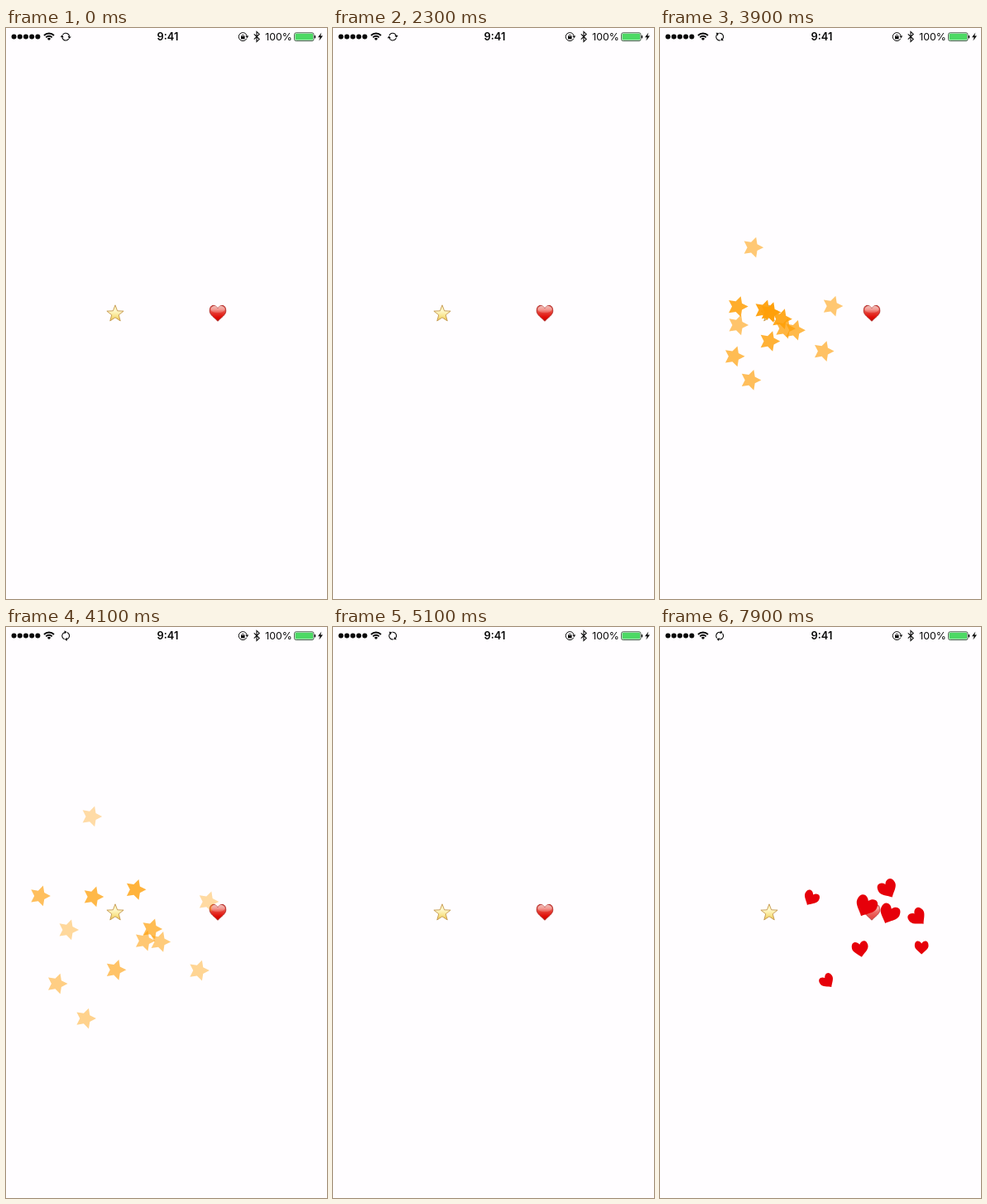
Recreate the animation shown at these times as an HTML page with a canvas. Size 388x690 px, loop 8 s.

```html
<!DOCTYPE html>
<html lang="en">
<head>
<meta charset="utf-8">
<title>Emitter buttons</title>
<style>
html, body { margin: 0; width: 100%; height: 100%; overflow: hidden; background: #fffdff; }
canvas { display: block; width: 388px; height: 690px; }
</style>
</head>
<body>
<canvas id="stage"></canvas>
<script>
const W = 388, H = 690, LOOP = 8000, TAU = Math.PI * 2;
const canvas = document.getElementById('stage');
const ratio = window.devicePixelRatio || 1;
canvas.width = W * ratio;
canvas.height = H * ratio;
const ctx = canvas.getContext('2d');
const INK = '#080808', FONT = 'Inter, "Liberation Sans", sans-serif';

// Each button switches off, then on again with a burst.
// Shots are velocities in px/s, with an optional tilt in degrees.
const starBtn = {
  x: 132, y: 345, off: 2850, on: 3460, span: 430,
  shots: [
    [-45, -181], [180, -21], [-95, 35], [177, 123], [-67, 238], [-140, 171], [116, 76],
    [83, 80], [1, 179], [-264, -58], [146, 66], [-104, -74], [116, -131]
  ]
};
const heartBtn = {
  x: 256, y: 344.5, off: 6550, on: 7520, span: 340,
  shots: [
    [158, 111, 0], [-153, 235, -36], [-233, -54, 30], [-52, 165, -10],
    [255, 28, -42], [119, -175, -28], [206, 20, 24], [-175, -175, 26]
  ]
};

const rad = deg => deg * Math.PI / 180;
const isOn = (btn, t) => t < btn.off || t >= btn.on;

function at(x, y, angle, draw) {
  ctx.save();
  ctx.translate(x, y);
  ctx.rotate(angle);
  draw();
  ctx.restore();
}

function starPath(r, inner) {
  ctx.beginPath();
  for (let i = 0; i < 10; i++) {
    const a = -Math.PI / 2 + i * Math.PI / 5;
    const d = i % 2 ? r * inner : r;
    ctx.lineTo(Math.cos(a) * d, Math.sin(a) * d);
  }
  ctx.closePath();
}

function heartPath(w, h) {
  const x = w / 2, y = h / 2;
  ctx.beginPath();
  ctx.moveTo(0, -y * 0.62);
  for (const side of [1, -1]) {
    const p = side * x;
    if (side > 0) {
      ctx.bezierCurveTo(p * 0.28, -y * 1.14, p, -y * 1.2, p, -y * 0.3);
      ctx.bezierCurveTo(p, y * 0.22, p * 0.32, y * 0.6, 0, y);
    } else {
      ctx.bezierCurveTo(p * 0.32, y * 0.6, p, y * 0.22, p, -y * 0.3);
      ctx.bezierCurveTo(p, -y * 1.2, p * 0.28, -y * 1.14, 0, -y * 0.62);
    }
  }
  ctx.closePath();
}

function gradient(top, bottom, stops) {
  const g = ctx.createLinearGradient(0, top, 0, bottom);
  stops.forEach((c, i) => g.addColorStop(i / (stops.length - 1), c));
  return g;
}

function paint(fill, stroke, width) {
  if (fill) { ctx.fillStyle = fill; ctx.fill(); }
  if (stroke) { ctx.strokeStyle = stroke; ctx.lineWidth = width; ctx.stroke(); }
}

function starButton(filled) {
  at(starBtn.x, starBtn.y + 0.4, 0, () => {
    starPath(10.6, 0.42);
    ctx.lineJoin = 'round';
    if (!filled) return paint(null, '#e8a94a', 1);
    paint(gradient(-10, 9, ['#fff4b0', '#fff8cc', '#f9e58e', '#e8bd4a']), '#c4974f', 0.9);
  });
}

function heartButton(filled, alpha) {
  at(heartBtn.x, heartBtn.y + 0.3, 0, () => {
    ctx.globalAlpha = alpha;
    if (!filled) {
      heartPath(16, 17);
      return paint(null, '#d4424e', 1.2);
    }
    heartPath(19.6, 19);
    paint(gradient(-10, 10, ['#c9504c', '#ea6a61', '#e5342b', '#e00b05', '#b80d08']), '#ae2522', 0.9);
    ctx.clip();
    ctx.beginPath();
    ctx.ellipse(0, -5, 8.6, 4.5, 0, 0, TAU);
    paint(gradient(-9, 0, ['rgba(255,235,230,.72)', 'rgba(255,205,200,.12)']));
  });
}

// Particles leave one after another, fly straight and live for one second.
function burst(btn, t, draw) {
  btn.shots.forEach(([vx, vy, tilt = 18], i, all) => {
    const birth = btn.on + btn.span * (i / (all.length - 1)) ** 1.3;
    const age = (t - birth) / 1000;
    if (age < 0 || age >= 1) return;
    at(btn.x + vx * age, btn.y + vy * age, rad(tilt), () => draw(age));
  });
}

function starParticle(age) {
  ctx.globalAlpha = 1 - age;
  starPath(13, 0.51);
  paint('#ff9f08');
}

function heartParticle(age) {
  const w = 27 * (1 - age);
  ctx.translate(0, 0.8);
  heartPath(w, w * 0.96);
  paint('#e6000a');
}

function poly(points, fill) {
  ctx.beginPath();
  points.forEach(([x, y]) => ctx.lineTo(x, y));
  if (fill) { ctx.closePath(); paint(INK); }
  else paint(null, INK, 1.1);
}

function arc(x, y, r, from, to, width) {
  ctx.beginPath();
  ctx.arc(x, y, r, rad(from), rad(to));
  paint(null, INK, width);
}

function pill(x, y, w, h, r, fill, stroke) {
  ctx.beginPath();
  ctx.roundRect(x, y, w, h, r);
  paint(fill, stroke, 0.9);
}

function label(text, x, font, align) {
  ctx.font = font + ' ' + FONT;
  ctx.textAlign = align;
  ctx.fillStyle = INK;
  ctx.fillText(text, x, 15.2);
}

function syncIcon(t) {
  at(72.2, 10.6, Math.PI * (t - 2300) / 1200, () => {
    for (let i = 0; i < 2; i++) {
      arc(0, 0, 4.4, 200, 340, 1.1);
      poly([[2.2, -1.6], [6.4, -1.6], [4.5, 1.2]], true);
      ctx.rotate(Math.PI);
    }
  });
}

function statusBar(t) {
  for (let i = 0; i < 5; i++) {
    ctx.beginPath();
    ctx.arc(9.6 + i * 7.2, 10.6, 3, 0, TAU);
    paint(INK);
  }
  // wifi
  for (const r of [1.5, 5.2, 8.5]) arc(52, 15, r, 225, 315, r < 2 ? 3 : 1.9);

  syncIcon(t);
  label('9:41', 195.4, '600 12.8px', 'center');

  // rotation lock
  arc(286.3, 10.6, 5, 25, 345, 1);
  poly([[289.3, 9.6], [293.3, 9.6], [291.4, 12.2]], true);
  ctx.fillStyle = INK;
  ctx.fillRect(284, 10, 4.6, 3.4);
  arc(286.3, 9.9, 1.5, 180, 360, 0.9);

  // bluetooth
  poly([[299.8, 7.4], [306.2, 13.6], [303, 16.6], [303, 4.4], [306.2, 7.4], [299.8, 13.6]]);

  label('100%', 345.8, '400 12.3px', 'right');

  // battery and charging bolt
  pill(348.6, 5.8, 23.4, 9.8, 2, null, '#2c4a31');
  pill(349.6, 6.8, 21.4, 7.8, 1, '#4cd964');
  pill(372.7, 9, 1.5, 3.4, 0.7, INK);
  poly([[381.4, 5.6], [377, 11.3], [379.6, 11.3], [378.4, 15.4], [383, 9.6], [380.2, 9.6]], true);
}

function render(now) {
  const t = now % LOOP;
  ctx.setTransform(ratio, 0, 0, ratio, 0, 0);
  ctx.fillStyle = '#fffdff';
  ctx.fillRect(0, 0, W, H);
  statusBar(t);
  const fade = t < heartBtn.on ? 1 : Math.min(1, 0.3 + (t - heartBtn.on) / 900);
  starButton(isOn(starBtn, t));
  heartButton(isOn(heartBtn, t), fade);
  burst(starBtn, t, starParticle);
  burst(heartBtn, t, heartParticle);
}

const start = performance.now();
function tick() {
  render(performance.now() - start);
  requestAnimationFrame(tick);
}
tick();
</script>
</body>
</html>
```
